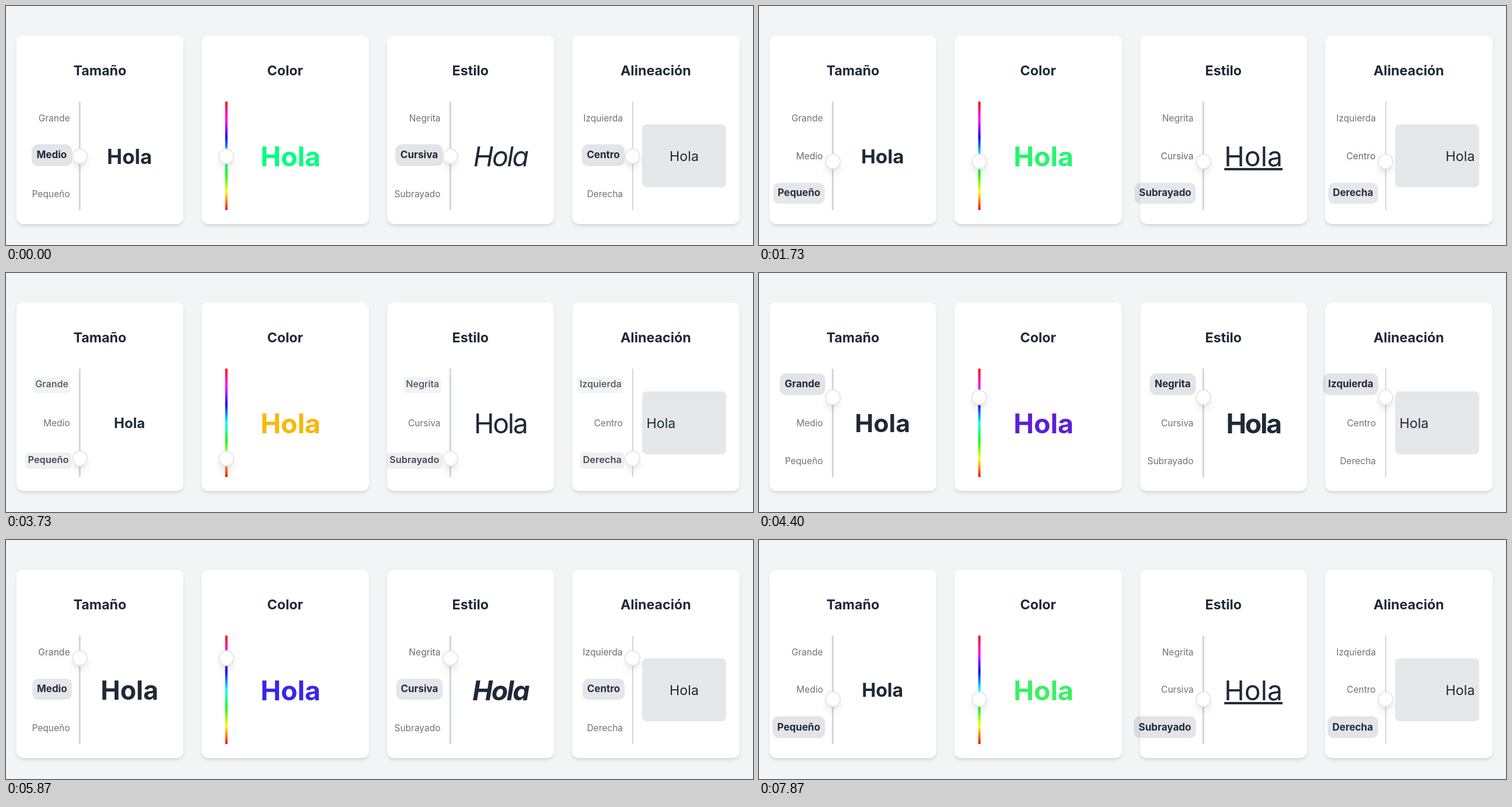
Animation, 1280 px wide and 410 px high, one loop 8 s. Source, as an HTML page:

```html
<!DOCTYPE html>
<html lang="es">
<head>
<meta charset="utf-8">
<title>Deslizadores</title>
<style>
  html, body { margin: 0; width: 100%; height: 100%; overflow: hidden; }
  body { position: relative; background: #f3f4f6; color: #1f2937; font-family: Inter, sans-serif; line-height: 1.21; }
  body * { position: absolute; box-sizing: border-box; white-space: nowrap; }
  .card {
    top: 50.5px; width: 286.7px; height: 323px; border-radius: 11.6px; background: #fff;
    box-shadow: 0 4px 6px -1px rgba(0,0,0,.1), 0 2px 4px -1px rgba(0,0,0,.06);
  }
  .title { top: 111px; transform: translate(-50%, -50%); font-size: 23.25px; font-weight: 700; }
  .track { left: 0; top: 164px; height: 186px; background: #d1d5db; }
  .hue { background: linear-gradient(#f00, #f0f, #00f, #0ff, #0f0, #ff0, #f00); }
  .box { left: 1090.3px; top: 203px; width: 143.4px; height: 108px; border-radius: 7.75px; background: #e5e7eb; }
  .label { font-size: 15.5px; }
  .thumb {
    top: 0; width: 27px; height: 27px; margin: -13.5px; border: 2px solid #e5e7eb; border-radius: 50%; background: #fff;
    box-shadow: 0 10px 15px -3px rgba(0,0,0,.1), 0 4px 6px -2px rgba(0,0,0,.05);
  }
  .hola { top: 257.5px; transform: translate(-50%, -50%); font-size: 46.5px; }
</style>
</head>
<body>
<script>
const LOOP = 8000, MID = 257.2, STEP = 65;

// level: 0 top, 1 middle, 2 bottom
const moves = [
  { text: 1270, start: 1436, level: 2 },
  { text: 3330, start: 3583, level: 0 },
  { text: 5200, start: 5563, level: 1 },
  { text: 7200, start: 7491, level: 2 },
];

const columns = [
  { title: 'Tamaño', card: 17.5, track: [124.8, 3], right: 109.5, hola: 211.7, labels: ['Grande', 'Medio', 'Pequeño'] },
  { title: 'Color', card: 335, track: [375.6, 4], hola: 487.6, labels: [] },
  { title: 'Estilo', card: 652.5, track: [759.8, 3], right: 744.5, hola: 847.2, labels: ['Negrita', 'Cursiva', 'Subrayado'] },
  { title: 'Alineación', card: 970, track: [1072.8, 2], right: 1057, hola: 1162, labels: ['Izquierda', 'Centro', 'Derecha'] },
];

function add(cls, style, text = '') {
  const el = document.createElement('div');
  el.className = cls;
  el.textContent = text;
  Object.assign(el.style, style);
  document.body.append(el);
  return el;
}

const px = n => n + 'px';
const mix = (a, b, k) => a + (b - a) * k;

function bezier(x1, x2) {
  const at = (a, b, s) => 3 * a * s * (1 - s) ** 2 + 3 * b * s * s * (1 - s) + s ** 3;
  return x => {
    if (x <= 0) return 0;
    if (x >= 1) return 1;
    let lo = 0, hi = 1;
    for (let i = 0; i < 24; i++) {
      const m = (lo + hi) / 2;
      if (at(x1, x2, m) < x) lo = m; else hi = m;
    }
    return at(0, 1, lo);
  };
}
const slide = bezier(.42, .58), fade = bezier(.4, .2);

const thumbs = [], labels = [], holas = [];
for (const c of columns) {
  const [x, w] = c.track;
  add('card', { left: px(c.card) });
  add('title', { left: px(c.card + 143.35) }, c.title);
  add(c.labels.length ? 'track' : 'track hue', { transform: `translateX(${x}px)`, width: px(w) });
  if (c.title === 'Alineación') add('box');
  c.labels.forEach((name, level) => {
    const el = add('label', { right: px(1280 - c.right), top: px(MID + .7 + (level - 1) * STEP) }, name);
    labels.push({ el, level });
  });
  thumbs.push(add('thumb', { left: px(x + w / 2) }));
  holas.push(add('hola', { left: px(c.hola) }, 'Hola'));
}
const [size, color, style, align] = holas;
size.style.fontWeight = color.style.fontWeight = 700;
align.style.fontSize = '23.25px';

const anchors = [['1097.5px', '0'], ['1162px', '-50%'], ['1226.5px', '-100%']];
const colors = [[64, 0, 255], [0, 255, 128], [255, 191, 0]];
const sizes = [46.5, 34.9, 23.25], weights = [700, 400, 400];

function drawLabel({ el, level }, from, to, k) {
  const p = (level === from ? 1 - k : 0) + (level === to ? k : 0);
  const s = el.style;
  s.padding = px(7.75 * p);
  s.borderRadius = px(10 * p);
  s.fontWeight = mix(400, 700, p);
  s.color = `rgb(${mix(107, 31, p)}, ${mix(114, 41, p)}, ${mix(128, 55, p)})`;
  s.background = `rgba(40, 50, 80, ${.13 * p})`;
  s.transform = `translateY(calc(-50% - ${2 * p}px)) scale(${1 + .1 * p})`;
}

function draw(t) {
  let from = 1, to = 1, start = 0, level = 1;
  for (const m of moves) {
    if (t >= m.text) level = m.level;
    if (t >= m.start) [from, to, start] = [to, m.level, m.start];
  }
  const k = slide((t - start) / 1130), f = fade((t - start) / 450);
  const between = list => mix(list[from], list[to], k);

  const y = MID + (mix(from, to, k) - 1) * STEP;
  for (const el of thumbs) el.style.transform = `translateY(${y}px)`;
  for (const l of labels) drawLabel(l, from, to, f);

  size.style.fontSize = px(between(sizes));
  color.style.color = `rgb(${[0, 1, 2].map(i => mix(colors[from][i], colors[to][i], k))})`;
  style.style.fontWeight = between(weights);
  style.style.letterSpacing = level === 2 ? '0' : '-.05em';
  style.style.fontStyle = level === 1 ? 'italic' : 'normal';
  style.style.textDecoration = level === 2 ? 'underline' : 'none';
  align.style.left = anchors[level][0];
  align.style.transform = `translate(${anchors[level][1]}, -50%)`;
}

const origin = performance.now();
function frame() {
  draw((performance.now() - origin) % LOOP);
  requestAnimationFrame(frame);
}
frame();
</script>
</body>
</html>
```
